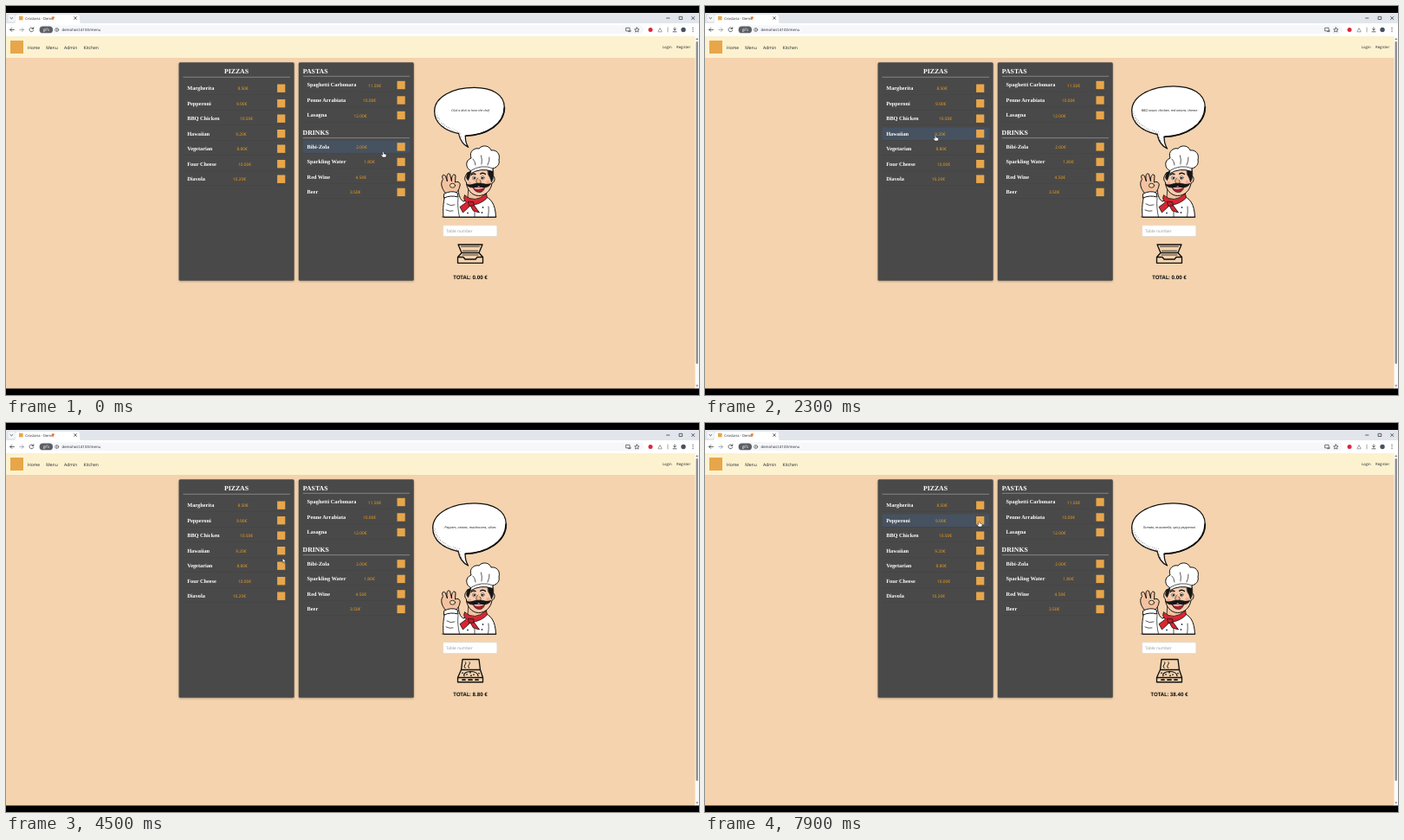
Animation of 800 by 450 pixels, one loop 8 s. Source, as an HTML page:

```html
<!DOCTYPE html>
<html lang="en">
<head>
<meta charset="utf-8">
<title>Pizza menu</title>
<style>
html, body { margin: 0; width: 100%; height: 100%; overflow: hidden; background: #000; }
svg { display: block; width: 800px; height: 450px; text-rendering: geometricPrecision; }
text { font-family: "Open Sans", "Noto Sans", sans-serif; white-space: pre; }
.serif { font-family: "Liberation Serif", "Noto Serif", serif; font-weight: 700; fill: #fff; }
.name { font-size: 6.3px; }
.head { font-size: 7.8px; }
.price { font-size: 4.85px; fill: #f5a01c; }
.nav { font-size: 5px; font-weight: 500; fill: #1d2330; }
.small { font-size: 4.3px; fill: #22262e; }
.ink { fill: none; stroke: #111; stroke-linecap: round; stroke-linejoin: round; }
.icon { fill: none; stroke: #3c4043; stroke-width: .8; stroke-linecap: round; stroke-linejoin: round; }
#speech { font: italic 3.75px "Noto Sans", "Open Sans", sans-serif; fill: #222; text-anchor: middle; }
#total { font-size: 6.1px; font-weight: 700; text-anchor: middle; fill: #111; }
</style>
</head>
<body>
<svg viewBox="0 0 800 450" xmlns="http://www.w3.org/2000/svg">
  <defs>
    <filter id="shadow" x="-5%" y="-5%" width="110%" height="110%">
      <feDropShadow dx="0" dy=".8" stdDeviation="1" flood-opacity=".3"/>
    </filter>
    <pattern id="dots" width="2.4" height="2.4" patternUnits="userSpaceOnUse" patternTransform="rotate(35)">
      <circle cx="1.2" cy="1.2" r=".48" fill="#777"/>
    </pattern>
  </defs>

  <!-- browser window -->
  <rect width="800" height="450"/>
  <rect y="8" width="800" height="13" fill="#e2e6ec"/>
  <rect y="20" width="800" height="15" fill="#fff"/>
  <path d="M8 20.5Q11 20.5 11 17V13Q11 10 14 10H82Q85 10 85 13V17Q85 20.5 88 20.5Z" fill="#fff"/>
  <rect x="2.5" y="10" width="8" height="8" rx="2" fill="#f4f6f9"/>
  <path class="icon" d="M5 13.5l1.4 1.3 1.4-1.3M78.7 12.6l2.8 2.8m0-2.8l-2.8 2.8M762.5 14h3.4M777.5 12.3h3.2v3.2h-3.2zM791.6 12.4l3.2 3.2m0-3.2l-3.2 3.2"/>
  <rect x="15" y="11.7" width="4.6" height="4.6" fill="#e8a64a"/>
  <text class="small" x="22.3" y="15.6" style="font-size:4.1px">Crostaria - Demo</text>
  <path d="M54 16.2l-1.7-3.4q2.2-1.3 4 .2z" fill="#e8772e"/>
  <rect x="37" y="22.3" width="699" height="10" rx="5" fill="#f5f7fa"/>
  <path class="icon" d="M9.4 27.5H4.8m2-2l-2 2 2 2"/>
  <path class="icon" style="stroke:#9a9da1" d="M15.8 27.5h4.6m-2-2l2 2-2 2"/>
  <path class="icon" d="M31.4 26a2.4 2.4 0 1 0 .3 2.2M31.8 24.7v1.8H30"/>
  <rect x="38.7" y="23.5" width="15.3" height="7.8" rx="3.9" fill="#5b5e63"/>
  <text x="46.4" y="29" text-anchor="middle" font-size="4.6" fill="#fff">gifs</text>
  <circle class="icon" cx="58.7" cy="27.5" r="2" style="stroke-width:.6"/>
  <path class="icon" style="stroke-width:.6" d="M58.7 27.4v1M58.7 26.4v.05"/>
  <text class="small" x="64.5" y="29">demohost:4100/menu</text>
  <path class="icon" d="M716 25.3h4v3.6h-4zM721 28v1.6h-2.5M728.3 24.9l.8 1.8 1.9.2-1.4 1.3.4 1.9-1.7-1-1.7 1 .4-1.9-1.4-1.3 1.9-.2z" style="stroke-width:.7"/>
  <circle cx="744" cy="27.5" r="2.5" fill="#d9283c"/>
  <path class="icon" d="M753 29.5l2-4 2 4zM764 25v5" style="stroke:#8b8f94"/>
  <path class="icon" d="M772 25v3m-1.4-1.3l1.4 1.4 1.4-1.4M770 29.8h4"/>
  <circle cx="782" cy="27.5" r="2.7" fill="#46515f"/>
  <g fill="#3c4043"><circle cx="793" cy="25.4" r=".6"/><circle cx="793" cy="27.5" r=".6"/><circle cx="793" cy="29.6" r=".6"/></g>

  <!-- page -->
  <rect y="35" width="796" height="407.5" fill="#f4d3ae"/>
  <rect y="35" width="796" height="25" fill="#fdf2d0"/>
  <rect x="795.5" y="35" width="4.5" height="407.5" fill="#fafafa"/>
  <rect x="796.6" y="41" width="2.2" height="373" rx="1.1" fill="#858585"/>
  <path d="M796.3 39l1.5-2 1.5 2zM796.3 438.5l1.5 2 1.5-2z" fill="#777"/>
  <rect x="5" y="40" width="15" height="15" fill="#e8a64a"/>
  <text class="nav" x="25" y="49.7">Home</text>
  <text class="nav" x="46.3" y="49.7">Menu</text>
  <text class="nav" x="67" y="49.7">Admin</text>
  <text class="nav" x="89.5" y="49.7">Kitchen</text>
  <text class="small" x="757.8" y="49.4">Login</text>
  <text class="small" x="774" y="49.4">Register</text>

  <g fill="#4a4a4a" filter="url(#shadow)">
    <rect x="199.5" y="65.3" width="133.2" height="252.5" rx="1.5"/>
    <rect x="337.8" y="65.3" width="133" height="252.5" rx="1.5"/>
  </g>
  <text class="serif head" x="266" y="77.7" text-anchor="middle">PIZZAS</text>
  <text class="serif head" x="342.8" y="77.7">PASTAS</text>
  <text class="serif head" x="342.5" y="149.3">DRINKS</text>
  <path d="M204.5 82.3H328M342.8 81.3H466M342.8 152.7H466" stroke="#a0a0a0" stroke-width=".7"/>
  <g id="rows"></g>

  <!-- speech bubble -->
  <g id="bubble">
    <path d="M522 148.5C505 145 492.6 136 492.7 121C493 104 515 92.8 541 92.9C562 93 577.3 101 577.3 117C577 137 556 150.5 530.2 151.3C529.8 157 531 161 533.6 165C527 162 523.6 156 522 148.5Z" fill="#fff" stroke="#111" stroke-width="1.3" stroke-linejoin="round"/>
    <path d="M494 120C497 134 508 143 523 146L527 158C524 155 523 151 522 148C507 145 494 136 494 120Z" fill="url(#dots)" stroke="url(#dots)" stroke-width="2"/>
    <path class="ink" d="M577.3 117C577 137 556 150.5 530.2 151.3" stroke-width="1.8"/>
    <text id="speech" x="536" y="121.8"></text>
  </g>

  <!-- chef -->
  <g class="ink" stroke-width="1">
    <path fill="#fff" d="M505 244C504 235 505 224 508 215L522 213C523 219 524 224 528 226L550 219C560 222 565 229 565.5 244Z"/>
    <path d="M503.5 244H566M522 222C521 230 522 237 523.5 244M557 232C557.5 237 557 241 556.5 244M509 229q4 3 9 1M508 236q4 2 8 1M541 238v6" stroke-width=".7"/>
    <path fill="#f5c2a0" d="M508 217C502 211 501.5 204 504.5 200.5C502 196 505.5 193.5 507.5 197L509.5 203C508 196 509.5 192.5 512.5 194.5L514.5 203C514 197 516.5 193 519 196L518.5 204C522 202 525 205 524 208C523 213 520 217 517 218Z"/>
    <ellipse cx="515.5" cy="207.7" rx="3.1" ry="2.5" fill="#f4d3ae" stroke-width=".8"/>
    <path fill="#fff" d="M506 217Q514 213 521 216L522 221Q513 218.5 505.7 222Z"/>
    <path fill="#f5c2a0" d="M534 208L533 222Q545 230 554 218L558 206Z" stroke-width=".8"/>
    <path fill="#f8cdae" d="M533 193C530 196 528 200 531.5 204C531.5 212 538 219.5 545.5 219.5C554 219.5 560 213 561 205C565 204 565 197 561.5 196L560.5 189Q547 184 533 193Z"/>
    <path fill="#171717" d="M532.5 193L536.5 191.5Q536 197 533.5 202L531.5 199ZM556 188L562 188.5C563.5 194 563 199 560.5 204Q559 198 556.7 195Z" stroke-width=".5"/>
    <path fill="#fff" d="M536.5 190.5C530.5 188 529.5 178.5 537 176C534 168 541 163.7 546 165C551 159.3 559 162.5 560 167C566 166 571 171 569 178C570.5 183 566 187.5 562 187.8L562 191.5Q548 186.5 536 194Z"/>
    <path d="M536.5 190.5Q549 182.5 562 187.8M542 184q-.5-5-3-7M549 183q1-5-.5-10M556 184q2.5-5 2-9" stroke-width=".7"/>
    <path d="M537 195.4q2.2-2.2 5-.8M547.6 194.2q3-2.2 5.8.4" stroke-width="1.4"/>
    <ellipse cx="540.3" cy="198.9" rx="1.7" ry="2.1" fill="#fff" stroke-width=".5"/>
    <ellipse cx="550.2" cy="198.7" rx="1.8" ry="2.1" fill="#fff" stroke-width=".5"/>
    <g fill="#111" stroke="none"><circle cx="540.6" cy="199.1" r="1.05"/><circle cx="549.9" cy="198.9" r="1.05"/></g>
    <path fill="#f3b791" d="M544.8 199C541 203 543 205.7 545.5 205C548 206 549.5 203.5 547 201" stroke-width=".6"/>
    <g fill="#eda08c" stroke="none" opacity=".65"><circle cx="535.5" cy="205" r="1.9"/><circle cx="556.5" cy="204" r="2.2"/></g>
    <path fill="#a8232b" d="M539 209Q546 211 553 208.5C552 214.5 548.5 216 545.5 215.5C542 215 539.7 212.5 539 209Z" stroke-width=".6"/>
    <path d="M541 210.4Q546 212 551 210" stroke="#fff" stroke-width="1.2"/>
    <path fill="#171717" d="M545.7 205.5C541 203.8 538 208.5 531.5 205.8C533 211 542 211.5 545.8 208C550 211.5 558 210.5 560 205C554 208 550.5 203.5 545.7 205.5Z" stroke-width=".4"/>
    <path fill="#d92632" d="M529.5 219Q541 229 554.5 217L555.5 222Q549 228.5 540 230L546.5 239L539.5 237L536 231L527.5 239L524 232.5L531.5 227Q527 223.5 529.5 219Z" stroke-width=".8"/>
    <path fill="#c51f2c" d="M533.7 226.2L539.8 226.8L540 231L535 231.2Z" stroke-width=".7"/>
    <g fill="#27364c" stroke="none"><circle cx="533" cy="239.5" r=".9"/><circle cx="550.5" cy="233" r=".9"/><circle cx="549.5" cy="239" r=".9"/></g>
  </g>

  <!-- order -->
  <rect x="504.6" y="253.8" width="62.3" height="12.8" rx="1.2" fill="#fff" stroke="#d9d4cd" stroke-width=".6"/>
  <text x="508" y="262.3" font-size="4.75" fill="#989898">Table number</text>
  <g id="empty" class="ink" stroke-width="1.35">
    <path d="M522 276H550L546 285.5H526ZM526 285.5L521.5 290.5V297.3H550.5V290.5L546 285.5M521.5 290.5H528L530 293H542L544 290.5H550.5"/>
    <path d="M525.5 278.2H546.5M527.5 283.2H544.5M527 288H545" stroke-width=".8"/>
  </g>
  <g id="full" class="ink" stroke-width="1.35">
    <path d="M525.5 285.5L527 273.5H546L547.5 285.5ZM525.5 285.5L521.5 294.5V299.7H550.5V294.5L547.5 285.5M521.5 294.5H550.5"/>
    <path d="M529 292.8C526 286.5 545 285 545 292.8" stroke-width="1.1"/>
    <path d="M530 283.5q-2-2 0-4t.5-3M534.5 283.5q-2-2 0-4t.5-3" stroke-width="1"/>
    <path d="M527 289v.05M532 290.8v.05M536 288.7v.05M540 291v.05M546 289.5v.05M537 292.2v.05M527 297.2h3M534 297.2h4M542 297.2h3" stroke-width="1.7"/>
  </g>
  <text id="total" x="536" y="316.1"></text>

  <g id="cursor" stroke="#111" stroke-width=".45" stroke-linejoin="round" fill="#fff">
    <path id="hand" d="M-.7 .6Q0-.5 .7 .6V2.5L3 3Q3.7 3.3 3.5 4.4L3 6.5H-.7L-2.4 4Q-2.3 3-1.5 3.4L-.7 4Z"/>
    <path id="arrow" d="M0 0V5.3L1.2 4.2L2.1 6.2L3 5.8L2.1 3.9H3.7Z"/>
  </g>
</svg>
<script>
const LOOP = 8000, STEP = 100, PITCH = 17.5;
const $ = id => document.getElementById(id);

function add(parent, tag, attrs, label) {
  const el = document.createElementNS('http://www.w3.org/2000/svg', tag);
  for (const key in attrs) el.setAttribute(key, attrs[key]);
  if (label) el.textContent = label;
  parent.append(el);
  return el;
}

// Each item: name, price, left edge of the price.
const sections = [
  { x: 204.5, y: 95.2, items: [
    ['Margherita', '8.50', 267.4], ['Pepperoni', '9.90', 266], ['BBQ Chicken', '10.50', 270],
    ['Hawaiian', '9.20', 265.2], ['Vegetarian', '8.80', 266.5], ['Four Cheese', '10.00', 268],
    ['Diavola', '10.20', 261.8]] },
  { x: 342.9, y: 91.5, items: [
    ['Spaghetti Carbonara', '11.50', 418], ['Penne Arrabiata', '10.00', 412], ['Lasagna', '12.00', 401.4]] },
  { x: 342.9, y: 162.9, items: [
    ['Bibi-Zola', '2.00', 404.3], ['Sparkling Water', '1.80', 413.3], ['Red Wine', '4.50', 403.6],
    ['Beer', '3.50', 397]] }
];

const rows = sections.flatMap(({ x, y, items }) => items.map(([name, price, px], i) => {
  const cy = y + i * PITCH, g = $('rows');
  const back = add(g, 'rect', { x, y: cy - 7.3, width: 123.4, height: 14.6, rx: 1, fill: '#465260' });
  add(g, 'rect', { x, y: cy + 7.3, width: 123.4, height: .4, fill: '#414141' });
  add(g, 'text', { class: 'serif name', x: x + 4.7, y: cy + 1.9 }, name);
  add(g, 'text', { class: 'price', x: px, y: cy + 2 }, price + '€');
  add(g, 'rect', { x: x + 108.6, y: cy - 4.7, width: 9.2, height: 9.4, fill: '#e8a64a' });
  return { x, cy, back };
}));

// Pointer stops: time, x, y.
const path = [
  [0, 435.5, 168.5], [200, 435.5, 168.5], [1100, 320, 148.5], [1300, 320, 148.5],
  [1700, 264, 130], [1900, 264, 130], [2300, 266, 149.5], [2700, 266, 149.5],
  [3100, 272, 165], [3350, 272, 165], [3600, 308.5, 177.5], [3900, 319, 165],
  [4300, 319, 165], [4500, 319.3, 156.3], [4800, 319, 148], [5200, 319, 148],
  [5500, 319, 131], [5900, 319, 131], [6300, 276, 130], [6450, 276, 130],
  [6600, 287.5, 130.5], [7000, 268, 113], [7250, 268, 113], [7700, 316.5, 113.5], [8000, 316.5, 113.5]
];
const lines = [
  [1800, 'BBQ sauce, chicken, red onions, cheese'],
  [3300, 'Peppers, onions, mushrooms, olives'],
  [6500, 'BBQ sauce, chicken, red onions, cheese'],
  [7200, 'Tomato, mozzarella, spicy pepperoni']
];
const totals = [[0, '0.00'], [4100, '8.80'], [5000, '18.00'], [5700, '28.50'], [7800, '38.40']];

const clamp = v => Math.max(0, Math.min(1, v));
const latest = (list, t) => list.filter(item => item[0] <= t).pop();

function pointer(t) {
  const i = path.findIndex(stop => stop[0] > t);
  const [t0, x0, y0] = path[i - 1], [t1, x1, y1] = path[i];
  const k = (t - t0) / (t1 - t0), e = k * k * (3 - 2 * k);
  return [x0 + (x1 - x0) * e, y0 + (y1 - y0) * e];
}

function draw(t) {
  const [x, y] = pointer(t);
  let over = false;
  for (const row of rows) {
    const hit = x >= row.x && x <= row.x + 123.4 && Math.abs(y - row.cy) < 7.3;
    row.back.style.opacity = hit ? 1 : 0;
    over = over || hit;
  }
  $('cursor').setAttribute('transform', `translate(${x} ${y})`);
  $('hand').style.display = over ? '' : 'none';
  $('arrow').style.display = over ? 'none' : '';

  const line = latest(lines, t);
  const age = line ? t - line[0] : 0;
  const scale = .955 + .045 * clamp(age / 200);
  $('bubble').setAttribute('transform', `translate(535 128) scale(${scale}) translate(-535 -128)`);
  $('speech').textContent = line ? line[1] : 'Click a dish to hear the chef';
  $('speech').style.opacity = line ? clamp(age / 500) : 1;

  const sum = latest(totals, t)[1];
  $('total').textContent = `TOTAL: ${sum} €`;
  $('empty').style.display = sum === '0.00' ? '' : 'none';
  $('full').style.display = sum === '0.00' ? 'none' : '';
}

const start = performance.now();
function tick() {
  const t = (performance.now() - start) % LOOP;
  draw(Math.floor(t / STEP) * STEP);
  requestAnimationFrame(tick);
}
tick();
</script>
</body>
</html>
```
